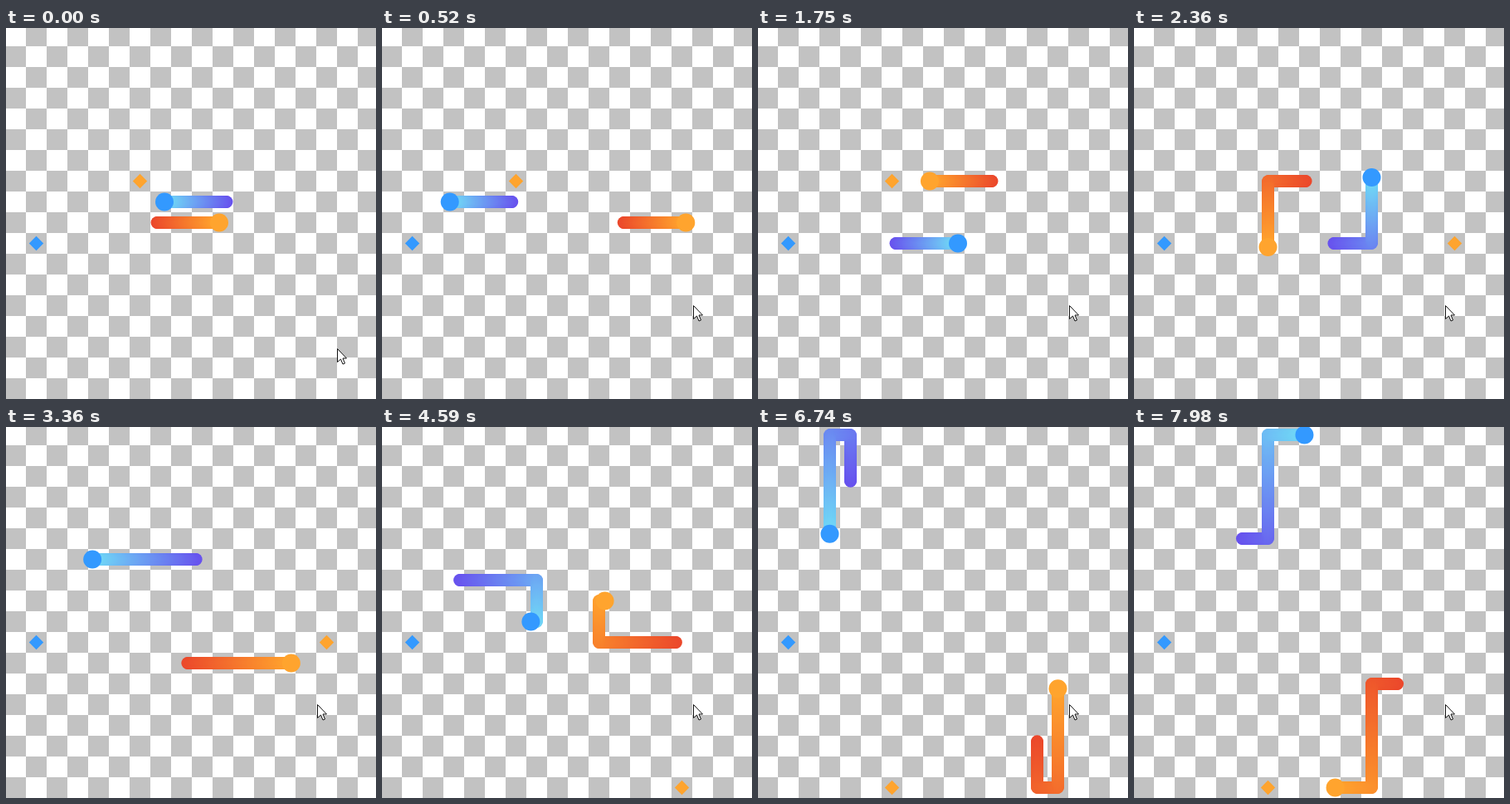
Write an HTML page with a canvas that moves like this. It is 446 px wide and 447 px high and loops after 8000 ms.

```html
<!DOCTYPE html>
<html lang="en">
<head>
<meta charset="utf-8">
<title>Mirrored snakes</title>
<style>
  html, body { margin: 0; width: 100%; height: 100%; overflow: hidden; background: #fff; }
  canvas { display: block; }
</style>
</head>
<body>
<canvas width="446" height="447"></canvas>
<script>
const ctx = document.querySelector('canvas').getContext('2d');
const LOOP = 8000, FRAME = 1000 / 13, STEP = 15.61;
const CELL = 25, START_LENGTH = 75;

// Grid cell centre in pixels.
const cellX = col => 11.5 + col * CELL;
const cellY = row => 9.5 + row * CELL;

// Corners of the blue snake's route, as grid cells; orange is its point reflection.
const route = [
  [2, 8], [2, 10], [11, 10], [11, 6], [2, 6], [2, 7], [7, 7], [7, 9],
  [4, 9], [4, 0], [3, 0], [3, 5], [6, 5], [6, 0], [9, 0]
].map(([col, row]) => [cellX(col), cellY(row)]);
route.unshift([191 + START_LENGTH, cellY(8)]);

// Orange food: where it lies, how far the head has travelled when it is eaten, and the growth.
const foods = [
  { col: 6, row: 7, eatenAt: 404.5, growth: 50 },
  { col: 15, row: 10, eatenAt: 754.5, growth: 25 },
  { col: 14, row: 17, eatenAt: 1254.5, growth: 50 },
  { col: 6, row: 17, eatenAt: Infinity, growth: 0 }
];

const blue = { head: '#3399ff', from: [112, 216, 246], to: [104, 82, 238] };
const orange = { head: '#ffa42e', from: [255, 162, 46], to: [235, 72, 44] };

const clamp = (value, low, high) => Math.min(high, Math.max(low, value));
const mix = (a, b, u) => a + (b - a) * u;

function pointAt(distance) {
  let left = distance + START_LENGTH;
  for (let i = 1; i < route.length; i++) {
    const [x0, y0] = route[i - 1], [x1, y1] = route[i];
    const size = Math.abs(x1 - x0) + Math.abs(y1 - y0);
    if (left <= size) return [mix(x0, x1, left / size), mix(y0, y1, left / size)];
    left -= size;
  }
  return route[route.length - 1];
}

function disc(x, y, radius, color) {
  ctx.fillStyle = color;
  ctx.beginPath();
  ctx.arc(x, y, radius, 0, 2 * Math.PI);
  ctx.fill();
}

function polygon(points, color) {
  ctx.fillStyle = color;
  ctx.beginPath();
  points.forEach(([x, y]) => ctx.lineTo(x, y));
  ctx.closePath();
  ctx.fill();
}

function drawBoard() {
  ctx.fillStyle = '#fff';
  ctx.fillRect(0, 0, 446, 447);
  ctx.fillStyle = '#c2c2c2';
  for (let row = 0; row < 18; row++)
    for (let col = 1 - row % 2; col < 18; col += 2)
      ctx.fillRect(col * CELL - 1, row * CELL - 3, CELL, CELL);
}

function drawFood(col, row, color) {
  const x = cellX(col), y = cellY(row), r = 8.7;
  polygon([[x - r, y], [x, y - r], [x + r, y], [x, y + r]], color);
}

function drawSnake(skin, distance, length, place) {
  for (let back = length; back >= 0; back--) {
    const [x, y] = place(pointAt(distance - back));
    const color = skin.from.map((c, i) => Math.round(mix(c, skin.to[i], back / length)));
    disc(x, y, 7.5, `rgb(${color})`);
  }
  const [x, y] = place(pointAt(distance));
  disc(x, y, 11, skin.head);
}

function drawCursor(t) {
  const u = clamp((t - 60) / 340, 0, 1);
  ctx.save();
  ctx.translate(Math.round(mix(399, 375, u)) + 0.5, Math.round(mix(386, 334, u)) + 0.5);
  polygon([[0, 0], [0, 16], [4, 12.5], [6.5, 18.5], [9, 17.5], [6.5, 11.5], [11, 11.5]], '#fff');
  ctx.strokeStyle = '#111';
  ctx.lineWidth = 1;
  ctx.stroke();
  ctx.restore();
}

function draw(t) {
  const distance = STEP * Math.floor((t + 30) / FRAME);
  const length = foods.reduce(
    (sum, food) => sum + clamp(distance - food.eatenAt, 0, food.growth), START_LENGTH);
  const food = foods.find(f => distance < f.eatenAt);

  drawBoard();
  drawFood(1, 10, blue.head);
  drawFood(food.col, food.row, orange.head);
  drawSnake(blue, distance, length, p => p);
  drawSnake(orange, distance, length, ([x, y]) => [448 - x, 444 - y]);
  drawCursor(t);
}

const begin = performance.now();
function tick() {
  draw((performance.now() - begin) % LOOP);
  requestAnimationFrame(tick);
}
tick();
</script>
</body>
</html>
```
